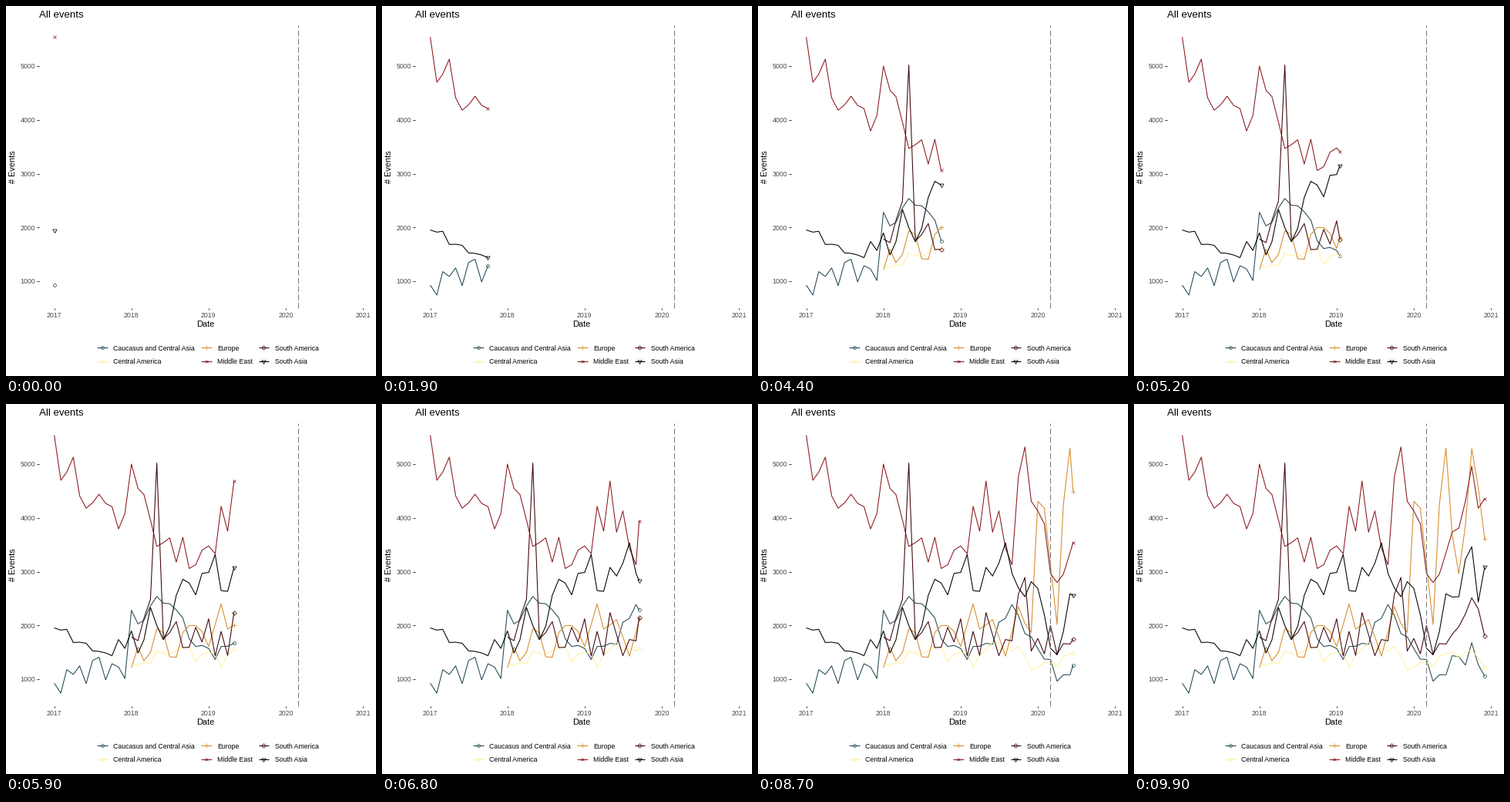
These frames come from a looping animation (480x480 px, 10 s). A matplotlib script:

```python
import numpy as np
import matplotlib.pyplot as plt
from matplotlib.animation import FuncAnimation
from matplotlib.path import Path

SIZE, FRAMES, INTERVAL = 480, 100, 100
LEFT, TOP, RIGHT, BOTTOM = 43, 25, 474.5, 391.5
LINE_W, POINT_W, R = 1.07, 0.75, 1.95

plt.rcParams["font.family"] = ["Liberation Sans"]

# Monthly counts; shorter series begin in January 2018.
CAUCASUS = [
    930, 745, 1180, 1090, 1250, 920, 1350, 1410, 990, 1290, 1230, 1015,
    2285, 2030, 2095, 2365, 2540, 2415, 2405, 2290, 2140, 1755, 1610, 1630,
    1575, 1370, 1610, 1615, 1670, 1650, 2060, 2135, 2390, 2190, 1850, 1790,
    1570, 1375, 1370, 965, 1085, 1085, 1440, 1420, 1265, 1680, 1270, 1060]
CENTRAL_AMERICA = [
    1310, 1255, 1310, 1295, 1530, 1480, 1460, 1535, 1590, 1610, 1310, 1470,
    1500, 1480, 1230, 1455, 1555, 1690, 1540, 1590, 1530, 1610, 1420, 1175,
    1230, 1310, 1320, 1225, 1430, 1475, 1510, 1400, 1510, 1540, 1400, 1220]
EUROPE = [
    1215, 1600, 1345, 1500, 1940, 1870, 1420, 1410, 1870, 2000, 2000, 1890,
    1610, 2020, 2400, 1935, 2010, 2110, 1790, 1430, 1880, 2350, 2040, 1870,
    4310, 4180, 3130, 2020, 4250, 5300, 3680, 2960, 3860, 5290, 4560, 3615]
MIDDLE_EAST = [
    5540, 4700, 4850, 5130, 4410, 4180, 4280, 4440, 4270, 4210, 3795, 4080,
    5000, 4550, 4435, 3960, 3470, 3540, 3630, 3180, 3640, 3060, 3130, 3400,
    3480, 3335, 4215, 3755, 4685, 3735, 4130, 3440, 3130, 4760, 5320, 4310,
    4130, 3890, 2965, 2800, 2955, 3350, 3740, 3810, 4310, 4960, 4180, 4355]
SOUTH_AMERICA = [
    1785, 1720, 2130, 2490, 5020, 1750, 1870, 2075, 1590, 1595, 1965, 1695,
    2125, 1435, 1890, 1445, 2240, 1830, 1440, 1740, 1715, 2580, 2895, 1525,
    1760, 1475, 2000, 1465, 1665, 1655, 1840, 1980, 2215, 2515, 2310, 1810]
SOUTH_ASIA = [
    1955, 1915, 1930, 1685, 1690, 1670, 1530, 1520, 1490, 1440, 1740, 1575,
    1900, 1490, 1735, 2335, 2000, 1735, 1985, 2560, 2860, 2790, 2570, 2970,
    2985, 3320, 2650, 2635, 3080, 2920, 3160, 3540, 2970, 2700, 2535, 2815,
    2690, 2200, 1580, 1455, 1890, 2590, 2530, 2535, 3230, 3465, 2435, 3090]


def polygon(*pts):
    return Path([*pts, pts[0]], closed=True)


def strokes(*pts):
    return Path(pts, [Path.MOVETO, Path.LINETO] * (len(pts) // 2))


Q = 2 ** 0.5
CIRCLE = Path.unit_circle()
TRIANGLE = polygon((0, 1.555), (1.347, -0.778), (-1.347, -0.778))
FLIPPED = polygon((0, -1.555), (1.347, 0.778), (-1.347, 0.778))
DIAMOND = polygon((-Q, 0), (0, Q), (Q, 0), (0, -Q))
PLUS = strokes((-Q, 0), (Q, 0), (0, -Q), (0, Q))
CROSS = strokes((-1, -1), (1, 1), (-1, 1), (1, -1))

SERIES = [
    ("Caucasus and Central Asia", "#254b57", CIRCLE, CAUCASUS),
    ("Central America", "#fff1a1", TRIANGLE, CENTRAL_AMERICA),
    ("Europe", "#d68d2d", PLUS, EUROPE),
    ("Middle East", "#8c1a20", CROSS, MIDDLE_EAST),
    ("South America", "#40070b", DIAMOND, SOUTH_AMERICA),
    ("South Asia", "#000000", FLIPPED, SOUTH_ASIA),
]

months = np.arange("2017-01", "2021-01", dtype="datetime64[M]")
days = (months.astype("datetime64[D]") - np.datetime64("2017-01-01")).astype(float)
# Each month lands on a whole frame; positions in between are linear.
keys = np.rint(days / days[-1] * (FRAMES - 1))


def px(day):
    return 62.6 + np.asarray(day) * (RIGHT - LEFT) / 1.1 / days[-1]


def py(count):
    return 357.2 - (np.asarray(count) - 1000) * 0.0698


fig = plt.figure(figsize=(SIZE / 72, SIZE / 72), dpi=72, facecolor="white")
ax = fig.add_axes([0, 0, 1, 1])
ax.set(xlim=(0, SIZE), ylim=(SIZE, 0))
ax.axis("off")


def segment(xs, ys, color, **kw):
    kw = {"lw": LINE_W, "solid_capstyle": "butt", **kw}
    return ax.plot(xs, ys, color=color, **kw)[0]


def point(x, y, color, shape):
    size = 2 * R * np.abs(shape.vertices).max()
    return ax.plot([x], [y], ls="", marker=shape, ms=size, mfc="none",
                   mec=color, mew=POINT_W, zorder=4, snap=False)[0]


def label(x, y, text, size=8.8, color="black", **kw):
    ax.text(x, y, text, size=size, color=color, **kw)


def draw_axes():
    label(43, 15.3, "All events", 13.2)
    label((LEFT + RIGHT) / 2, 416, "Date", 11, ha="center")
    label(13.6, (TOP + BOTTOM) / 2, "# Events", 11, rotation=90,
          ha="right", va="center")
    for count in range(1000, 5001, 1000):
        y = py(count)
        segment([LEFT - 2.75, LEFT], [y, y], "#333333")
        label(38.2, y + 3.2, str(count), color="#4d4d4d", ha="right")
    for year in range(2017, 2022):
        day = (np.datetime64(f"{year}-01-01") - np.datetime64("2017-01-01")).astype(int)
        x = px(day)
        segment([x, x], [BOTTOM, BOTTOM + 2.75], "#333333")
        label(x, 404.2, str(year), color="#4d4d4d", ha="center")
    x = px(days[38])
    segment([x, x], [BOTTOM, TOP], "#7f7f7f", ls=(0, (7, 3)), zorder=3)


def draw_legend():
    for i, (name, color, shape, _) in enumerate(SERIES):
        x, y = (125.2, 260.1, 334.4)[i // 2], 443.3 + 17.3 * (i % 2)
        segment([x - 6.9, x + 6.9], [y, y], color)
        point(x, y, color, shape)
        label(x + 14.2, y + 3.3, name)


draw_axes()
draw_legend()
lines = [segment([], [], color) for _, color, _, _ in SERIES]
heads = [point(0, 0, color, shape) for _, color, shape, _ in SERIES]


def update(n):
    x = px(np.interp(n, keys, days))
    for (_, _, _, counts), line, head in zip(SERIES, lines, heads):
        start = len(keys) - len(counts)
        k, xs, ys = keys[start:], px(days[start:]), py(counts)
        shown = n >= k[0]
        line.set_visible(shown)
        head.set_visible(shown)
        if not shown:
            continue
        y = np.interp(n, k, ys)
        past = k < n
        line.set_data(np.append(xs[past], x), np.append(ys[past], y))
        head.set_data([x], [y])
    return lines + heads


anim = FuncAnimation(fig, update, frames=FRAMES, interval=INTERVAL,
                     repeat=True, repeat_delay=0)
plt.show()
```
